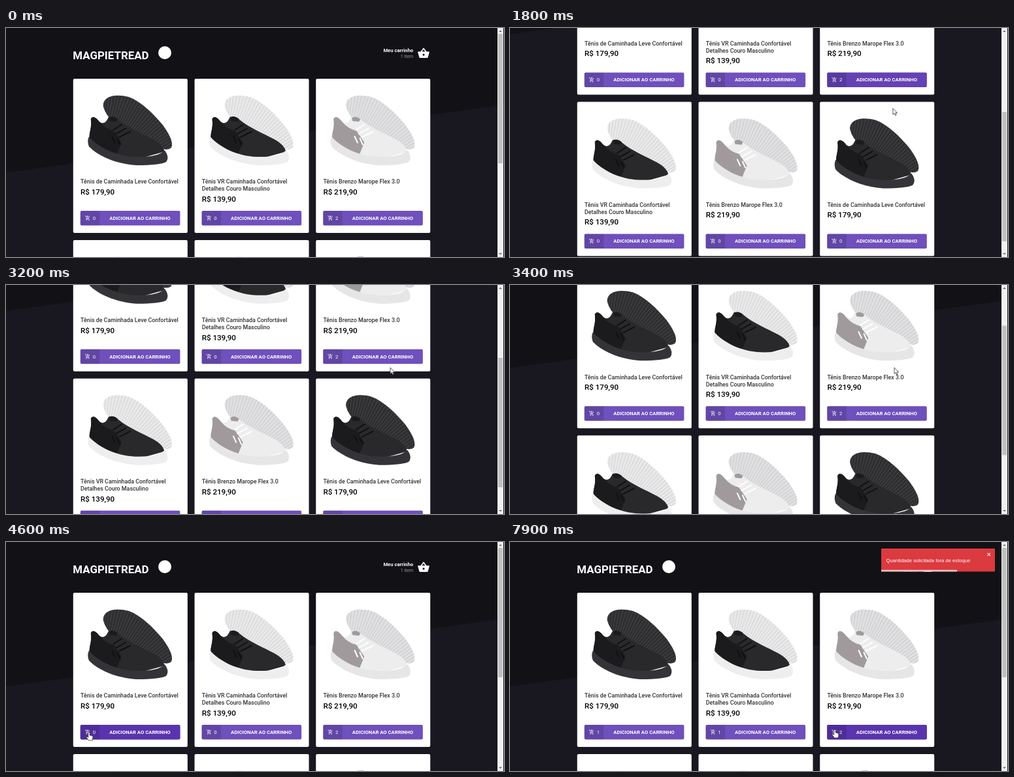
An HTML page that plays this animation: 762 by 352 pixels, repeating every 8 s.

```html
<!DOCTYPE html>
<html lang="pt-BR">
<head>
<meta charset="utf-8">
<style>
  html, body { margin: 0; height: 100%; overflow: hidden; background: #191820; }
  svg { display: block; font-family: Roboto, sans-serif; }
  .title { font-size: 8.85px; font-weight: 500; fill: #333; }
  .price { font-size: 11.6px; font-weight: 500; fill: #000; }
  .label { font-size: 7.7px; font-weight: 700; fill: #fff; text-anchor: middle; }
  .count { font-size: 7.7px; fill: #fff; text-anchor: middle; }
</style>
</head>
<body>
<svg id="stage" width="762" height="352" viewBox="0 0 762 352"></svg>
<script>
const LOOP = 8000, STEP = 100, PAGE = 591, VIEW = 352, TRACK = 334;
const CARD = { x: 102.8, y: 78, dx: 185.7, dy: 248, w: 175, h: 237 };
const BUTTON = { x: 11, y: 203, w: 152.6, h: 22.5 };
const ADD_FIRST = 4800, ADD_SECOND = 5900, TOAST = 7100;

const dark = { upper: '#29292c', heel: '#1b1b1e', lace: '#101012' };
const black = { ...dark, lines: ['Tênis de Caminhada Leve Confortável'], price: 'R$ 179,90',
  back: '#2e2e31', rib: '#434347', sole: '#343438' };
const mixed = { ...dark, lines: ['Tênis VR Caminhada Confortável', 'Detalhes Couro Masculino'], price: 'R$ 139,90',
  back: '#e9e9ea', rib: '#d6d6d8', sole: '#eeeeef' };
const light = { lines: ['Tênis Brenzo Marope Flex 3.0'], price: 'R$ 219,90',
  back: '#e0e0e2', rib: '#cdcdd0', upper: '#ededee', heel: '#a19a9c', lace: '#fff', sole: '#e6e6e7' };
const shelf = [black, mixed, light, mixed, light, black];

// Eased 0 to 1 between two times
function ease(t, from, to) {
  const p = Math.min(1, Math.max(0, (t - from) / (to - from)));
  return p * p * (3 - 2 * p);
}

const scrollAt = t => (PAGE - VIEW) * (ease(t, 1340, 1920) - ease(t, 2950, 3740));

const start = { x: 148, y: 30 };
const moves = [
  { from: 100, to: 500, x: 548, y: 290 },
  { from: 500, to: 900, x: 530, y: 134 },
  { from: 900, to: 1200, x: 585, y: 122 },
  { from: 1400, to: 2500, x: 588, y: 127 },
  { from: 3800, to: 4300, x: 170, y: 311 },
  { from: 4300, to: 4600, x: 127, y: 292 },
  { from: 5200, to: 5800, x: 312, y: 293 },
  { from: 6000, to: 6800, x: 497, y: 288 },
];
const cursorAt = t => moves.reduce((p, m) => {
  const k = ease(t, m.from, m.to);
  return { x: p.x + (m.x - p.x) * k, y: p.y + (m.y - p.y) * k };
}, start);

// Slides in from the right and settles with a small bounce
function toastOffset(t) {
  const s = (t - TOAST) / 100;
  return 160 * Math.exp(-s) * Math.cos(1.5 * s);
}

const cardX = i => CARD.x + i % 3 * CARD.dx;
const cardY = i => CARD.y + Math.floor(i / 3) * CARD.dy;

const BACK = 'M46 42C45 28 62 22 85 28C104 35 122 53 137 71C147 85 154 98 150 106C142 113 125 105 100 92C70 78 50 60 46 42Z';
const shoe = c => `
  <path d="${BACK}" fill="${c.back}"/>
  <path d="M44 38Q108 40 150 115" fill="none" stroke="${c.rib}" stroke-width="66" stroke-dasharray="1.2 3.2" clip-path="url(#tread)"/>
  <path d="M27 62C29 57 34 58 40 66C47 71 51 66 54 59Q62 56 69 63C85 76 105 84 122 93Q137 101 140 112L97 124Q50 116 25 92C24 82 29 76 27 62Z" fill="${c.upper}"/>
  <path d="M27 62C29 57 34 58 40 66Q49 77 62 80L74 98L66 118Q40 110 25 92C24 82 29 76 27 62Z" fill="${c.heel}"/>
  <path d="M55 60Q61 56 68 62L66 66L56 65Z" fill="${c.heel}"/>
  <path d="M61 79l14-9M65 85l16-9M70 90l18-9M59 88l5 11M67 91l5 11" fill="none" stroke="${c.lace}" stroke-width="2"/>
  <path d="M24 89C38 105 65 119 95 120Q130 121 140 110Q148 121 142 128Q132 133 97 133C65 131 37 118 24 104Q21 96 24 89Z" fill="${c.sole}"/>`;

const buttonRect = attrs =>
  `<rect x="${BUTTON.x}" y="${BUTTON.y}" width="${BUTTON.w}" height="${BUTTON.h}" rx="2" ${attrs}/>`;

const cartIcon = `<g transform="translate(17.7 209.8) scale(.37)" fill="none" stroke="#fff" stroke-width="2">
  <path d="M1 3h3.3l4 9h7.6l4-7.5M7.6 12l-1.6 3q-.6 1 1 1h12M8 5h8M12 1v8"/>
  <circle cx="7" cy="20" r="1"/><circle cx="17" cy="20" r="1"/></g>`;

const card = (p, i) => `<g transform="translate(${cardX(i)} ${cardY(i)})">
  <rect width="${CARD.w}" height="${CARD.h}" rx="2" fill="#fff"/>
  ${shoe(p)}
  ${p.lines.map((s, n) => `<text class="title" x="11.2" y="${161.3 + n * 11}">${s}</text>`).join('')}
  <text class="price" x="11.2" y="${167 + p.lines.length * 11}">${p.price}</text>
  ${buttonRect('fill="#6f50bc"')}${buttonRect('class="hover" fill="#5a34ae"')}
  <path d="M40.5 203H13q-2 0-2 2v18.5q0 2 2 2h27.5z" fill-opacity=".12"/>
  ${cartIcon}
  <text class="count" x="32" y="217">0</text>
  <text class="label" x="102.2" y="217">ADICIONAR AO CARRINHO</text>
</g>`;

stage.innerHTML = `
<clipPath id="tread"><path d="${BACK}"/></clipPath>
<rect width="762" height="352" fill="#191820"/>
<g id="page">
  <path d="M0 0H762V118L0 222Z" fill="#121116"/>
  <text x="102.3" y="47.5" font-size="16.9" font-weight="700" fill="#fff">MAGPIETREAD</text>
  <circle cx="243" cy="38" r="10" fill="#fff"/>
  <g text-anchor="end">
    <text x="623" y="36.8" font-size="7.65" font-weight="700" fill="#fff">Meu carrinho</text>
    <text id="items" x="623" y="46.2" font-size="6.9" fill="#999"></text>
  </g>
  <g transform="translate(629.3 29) scale(.805)">
    <path d="M1 10q0-1 1-1h20q1 0 1 1l-2.6 9.5q-.4 1.5-1.9 1.5h-13q-1.5 0-1.9-1.5z" fill="#fff"/>
    <path d="M7 10l5-7 5 7" fill="none" stroke="#fff" stroke-width="2" stroke-linejoin="round"/>
    <circle cx="12" cy="15" r="2" fill="#121116"/>
  </g>
  ${shelf.map(card).join('')}
</g>
<g id="toast">
  <rect x="568" y="10" width="174" height="35.5" rx="1" fill="#db3a3f"/>
  <text x="575.5" y="30.5" font-size="7.65" font-family="Liberation Sans, Arial, sans-serif" fill="#fff">Quantidade solicitada fora de estoque</text>
  <path d="M730.5 17l4.4 4.4m0-4.4l-4.4 4.4" stroke="#fff" stroke-opacity=".85" stroke-width="1.1"/>
  <rect id="progress" x="568" y="42.8" height="2.7" fill="#fff" fill-opacity=".7"/>
</g>
<rect x="752" width="9" height="352" fill="#f1f1f1"/>
<path d="M754.3 6l2.2-2.5 2.2 2.5zM754.3 346l2.2 2.5 2.2-2.5z" fill="#606060"/>
<rect id="thumb" x="753" width="7" height="${TRACK * VIEW / PAGE}" fill="#c1c1c1"/>
<g id="cursor" fill="#fff" stroke="#333" stroke-width=".8" stroke-linejoin="round">
  <path id="arrow" d="M0 0V9.5L2.2 7.6 3.7 11 5.2 10.3 3.8 7H6.7Z"/>
  <path id="hand" d="M-1.2 1Q0-.8 1.2 1V5L5 6Q6.3 6.500 6 8L5.2 13H-.6L-4 8.3Q-3.6 6.6-2 7.6L-1.2 8.3Z"/>
</g>`;

const hovers = stage.querySelectorAll('.hover');
const counts = stage.querySelectorAll('.count');
const move = (el, x, y) => el.setAttribute('transform', `translate(${x} ${y})`);
const show = (el, on) => el.setAttribute('visibility', on ? 'visible' : 'hidden');

function isOver(i, t) {
  const { x, y } = cursorAt(t);
  const left = x - cardX(i) - BUTTON.x, top = y + scrollAt(t) - cardY(i) - BUTTON.y;
  return left >= 0 && left <= BUTTON.w && top >= 0 && top <= BUTTON.h;
}

function draw(t) {
  const scroll = scrollAt(t), { x, y } = cursorAt(t);
  move(page, 0, -scroll);
  thumb.setAttribute('y', 9 + scroll * TRACK / PAGE);

  const first = +(t >= ADD_FIRST), second = +(t >= ADD_SECOND), total = 1 + first + second;
  items.textContent = total + (total > 1 ? ' itens' : ' item');
  [first, second, 2].forEach((n, i) => counts[i].textContent = n);

  // The hover colour takes two steps to fade in or out
  hovers.forEach((el, i) => el.setAttribute('opacity', (isOver(i, t) + isOver(i, t - STEP)) / 2));
  const pointing = shelf.some((_, i) => isOver(i, t));
  move(cursor, x, y);
  show(arrow, t >= STEP && !pointing);
  show(hand, t >= STEP && pointing);

  show(toast, t >= TOAST);
  move(toast, toastOffset(t), 0);
  progress.setAttribute('width', 174 * Math.min(1, 1 - (t - TOAST) / 2400));
}

function tick() {
  draw(Math.floor(performance.now() % LOOP / STEP) * STEP);
  requestAnimationFrame(tick);
}
tick();
</script>
</body>
</html>
```
